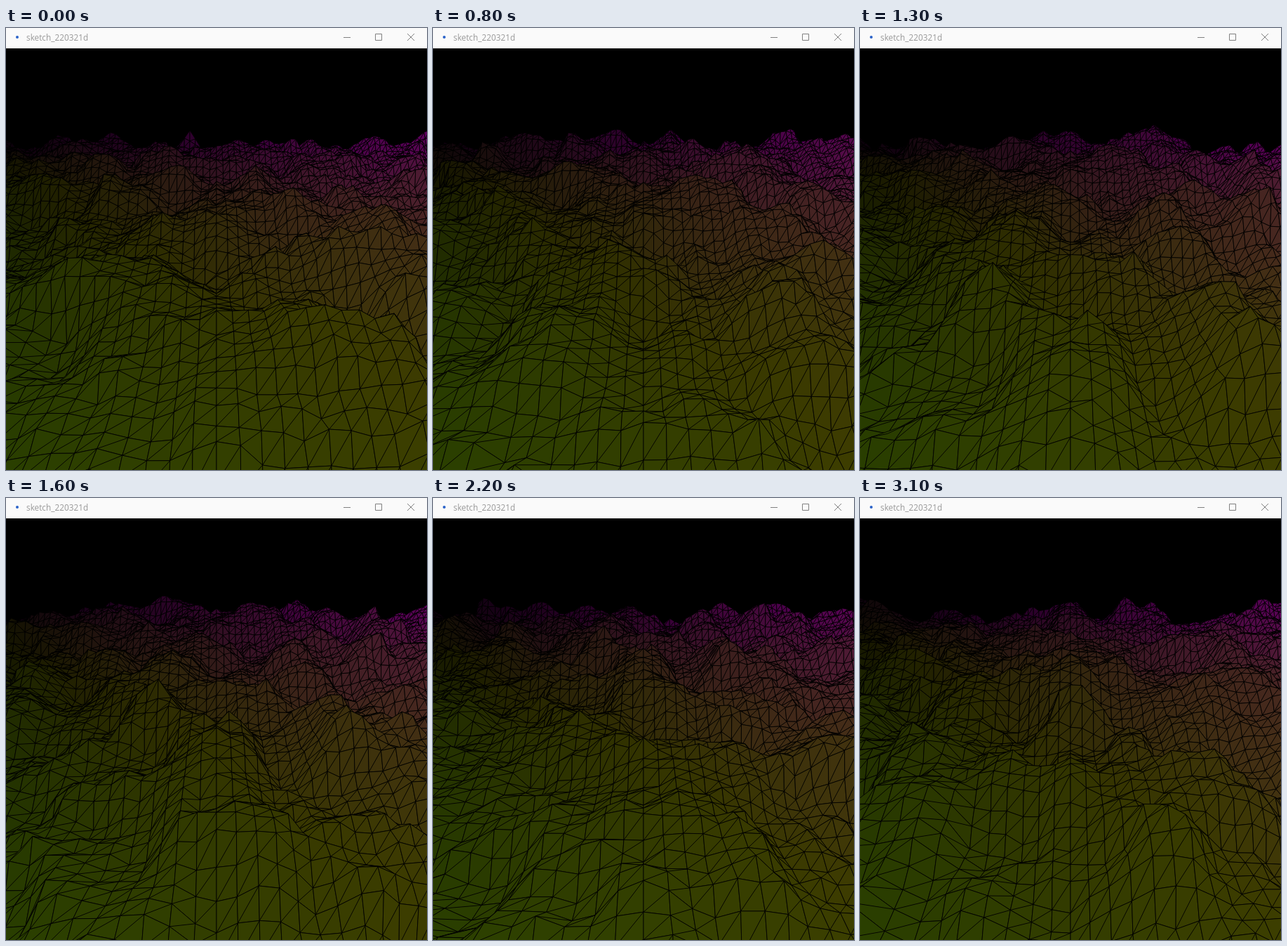
These frames come from a looping animation (600 by 629 pixels, 3.2 s). An HTML page with a canvas:

```html
<!DOCTYPE html>
<html lang="en">
<head>
<meta charset="utf-8">
<title>sketch_220321d</title>
<style>
  html, body { margin: 0; width: 100%; height: 100%; overflow: hidden; background: #000; }
  canvas { display: block; }
</style>
</head>
<body>
<canvas id="stage" width="600" height="629"></canvas>
<script>
const ctx = document.getElementById('stage').getContext('2d');
const W = 600, H = 629, BAR = 29;
const LOOP = 3200, STEP = 100;
const GRID = 100, CELL = 20;
const TILT = Math.PI / 3, SIN = Math.sin(TILT), COS = Math.cos(TILT);
const EYE = 300 / Math.tan(Math.PI / 6);
const DROP = 50;       // the plane hangs below the view centre
const ROWS_PER_STEP = 3; // drift away from the viewer
const ROUGH = 0.2;

// Seeded lattice noise: four octaves, cosine blending
let seed = 220321;
function random() {
  seed = (seed * 1664525 + 1013904223) >>> 0;
  return seed / 4294967296;
}
const lattice = Array.from({ length: 4096 }, random);
const node = (x, y) => lattice[(x + y * 61) & 4095];
const fade = f => (1 - Math.cos(f * Math.PI)) / 2;
const mix = (a, b, f) => a + (b - a) * f;

function noise(x, y) {
  let sum = 0;
  for (let amp = 0.5; amp > 0.05; amp /= 2) {
    const i = Math.floor(x), j = Math.floor(y), f = fade(x - i);
    const top = mix(node(i, j), node(i + 1, j), f);
    const bottom = mix(node(i, j + 1), node(i + 1, j + 1), f);
    sum += amp * mix(top, bottom, fade(y - j));
    x *= 2;
    y *= 2;
  }
  return sum;
}

function project(col, row, shift) {
  const x = (col - GRID / 2) * CELL, v = (row - GRID / 2) * CELL;
  const z = 200 * noise(col * ROUGH, (row + shift) * ROUGH) - 100;
  const depth = EYE - SIN * v - COS * z;
  const k = EYE / depth;
  return { x: W / 2 + x * k, y: BAR + 300 + (DROP + COS * v - SIN * z) * k, depth };
}

function visible(...points) {
  const xs = points.map(p => p.x);
  return points.every(p => p.depth > EYE / 10) &&
    points.some(p => p.y < H + 2) &&
    Math.max(...xs) > -2 && Math.min(...xs) < W + 2;
}

function path(...points) {
  ctx.beginPath();
  points.forEach(p => ctx.lineTo(p.x, p.y));
}

function drawCell(a, b, c, d, x, y) {
  ctx.fillStyle = `rgb(${x}, ${y}, ${Math.max(0, x - y)})`;
  path(a, b, c);
  ctx.fill();
  path(b, c, d);
  ctx.fill();
  path(b, a, c, d, b, c);
  ctx.stroke();
}

function drawTerrain(shift) {
  const line = row => Array.from({ length: GRID }, (_, col) => project(col, row, shift));
  ctx.strokeStyle = '#000';
  ctx.lineWidth = 0.85;
  ctx.lineJoin = 'round';
  let far = line(0);
  for (let row = 0; row < GRID - 1; row++) {
    const near = line(row + 1);
    for (let col = 0; col < GRID - 1; col++) {
      const cell = [far[col], near[col], far[col + 1], near[col + 1]];
      if (visible(...cell)) drawCell(...cell, col + 0.5, row + 0.5);
    }
    far = near;
  }
}

function drawBar() {
  ctx.fillStyle = '#fafafa';
  ctx.fillRect(0, 0, W, BAR);
  ctx.fillStyle = '#2a62c8';
  ctx.beginPath();
  ctx.arc(16, 13, 2, 0, Math.PI * 2);
  ctx.fill();
  ctx.fillStyle = '#999';
  ctx.font = '11.8px "Open Sans", sans-serif';
  ctx.fillText('sketch_220321d', 29, 18);
  ctx.strokeStyle = '#808080';
  ctx.lineWidth = 1;
  ctx.beginPath();
  ctx.moveTo(481, 13.5);
  ctx.lineTo(491, 13.5);
  ctx.rect(526.5, 8.5, 9, 9);
  ctx.moveTo(572, 8);
  ctx.lineTo(582, 18);
  ctx.moveTo(582, 8);
  ctx.lineTo(572, 18);
  ctx.stroke();
}

const start = performance.now();
let shown = -1;
function tick() {
  const step = Math.floor((performance.now() - start) % LOOP / STEP);
  if (step !== shown) {
    shown = step;
    ctx.fillStyle = '#000';
    ctx.fillRect(0, 0, W, H);
    drawTerrain(step * ROWS_PER_STEP);
    drawBar();
  }
  requestAnimationFrame(tick);
}
tick();
</script>
</body>
</html>
```
